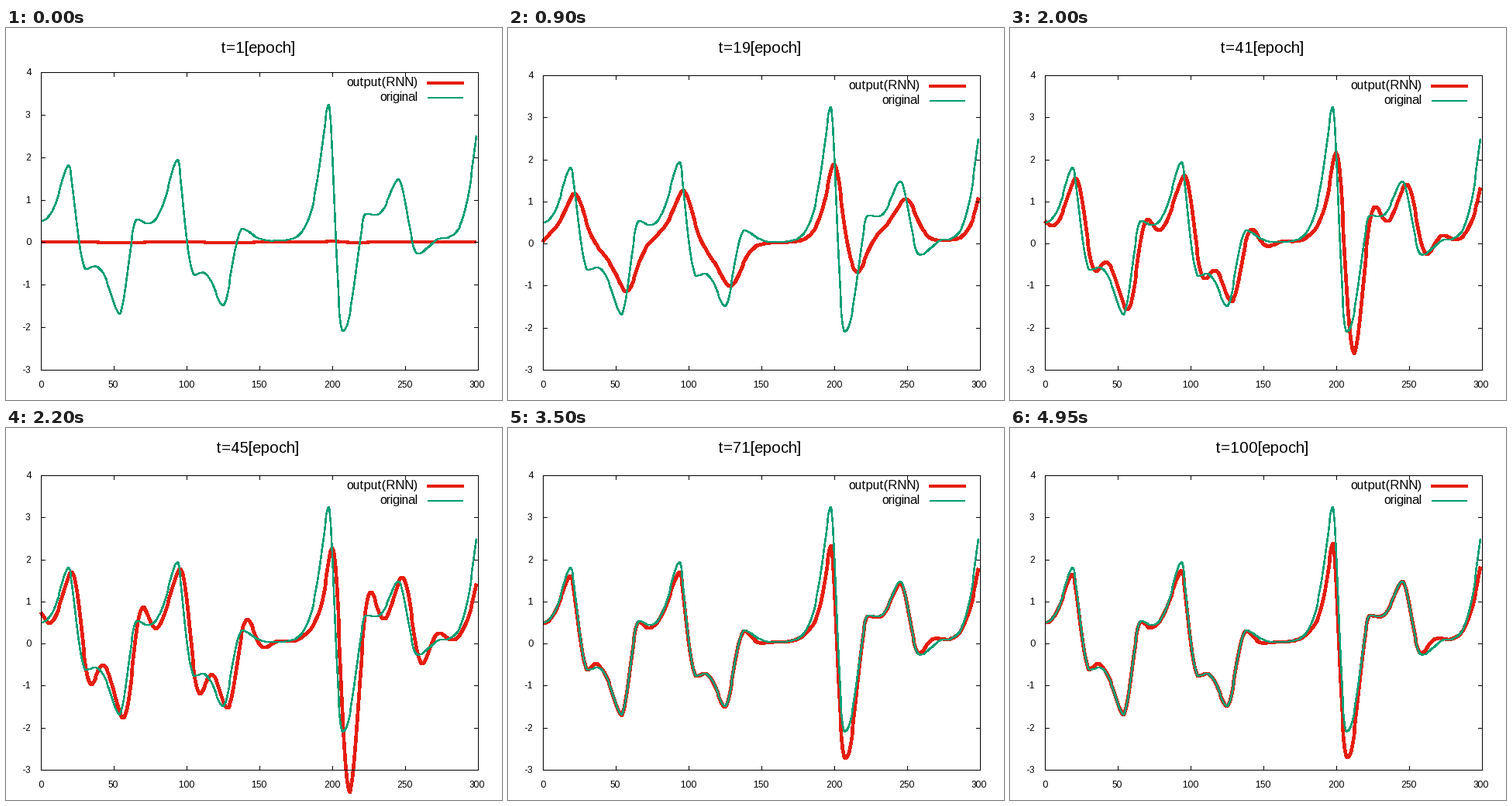
Write a matplotlib script that moves like this. It is 640 px wide and 480 px high and loops after 5000 ms.

```python
import numpy as np
import matplotlib.pyplot as plt
from matplotlib.animation import FuncAnimation

plt.rcParams.update({
    "font.family": "Liberation Sans",
    "text.hinting": "force_autohint",
    "text.hinting_factor": 1,
    "path.simplify": False,
})

W, H, DPI = 640, 480, 80
PT = 72 / DPI                      # one pixel in points
EPOCHS, STEP_MS = 100, 50
LEFT, RIGHT, BOTTOM = 45, 609, 441
RED, GREEN = "#e51e10", "#009e73"
STEPS = np.arange(300)

# Turning points of the signal: step, value, skew of the rise or fall before it.
TURNS = [
    (0, .5, 0), (19, 1.81, 1.27), (31, -.63, -.57), (37, -.565, 0),
    (54, -1.69, .9), (66, .535, -.1), (73.5, .44, 0), (93.8, 1.94, 1.2),
    (105.5, -.77, -.75), (111, -.71, 0), (125, -1.49, .7), (138.3, .32, -.27),
    (158, .035, -1.15), (197.8, 3.25, 3.7), (207.2, -2.1, -.65),
    (223, .67, .55), (230, .64, 0), (245.5, 1.49, .65), (258.5, -.27, -.2),
    (275, .09, 0), (302, 3.0, 2.5),
]
# Where the trained network misses the signal: centre, width, amount.
MISSES = [
    (19, 6, -.15), (36, 4, .09), (72, 4, -.07), (93, 6, -.2), (147, 6, -.1),
    (195.5, 9, -.9), (210, 5.5, -.55), (266, 6, .18), (302, 8, -.75),
]


def ease(t):
    t = np.clip(t, 0, 1)
    return t * t * (3 - 2 * t)


def skewed(t, k):
    """Ease whose time runs exponentially; k > 0 starts slowly."""
    return ease(np.expm1(k * t) / np.expm1(k) if k else t)


def make_signal():
    s = np.zeros(len(STEPS))
    for (x0, y0, _), (x1, y1, k) in zip(TURNS, TURNS[1:]):
        part = (STEPS >= x0) & (STEPS <= x1)
        s[part] = y0 + (y1 - y0) * skewed((STEPS[part] - x0) / (x1 - x0), k)
    return s


def leaky(u, rate):
    """First-order lag."""
    y, out = 0, []
    for value in u:
        y += rate * (value - y)
        out.append(y)
    return np.array(out)


def ringing(u, omega=.3, zeta=.4, y=.79, v=-.03):
    """Second-order lag with overshoot."""
    out = []
    for value in u:
        v += omega ** 2 * (value - y) - 2 * zeta * omega * v
        y += v
        out.append(y)
    return np.array(out)


signal = make_signal()
trained = signal + sum(a * np.exp(-((STEPS - c) / w) ** 2) for c, w, a in MISSES)
midway = ringing(trained)


def output(epoch):
    """Network output: flat, then a lagging copy, then a close fit."""
    if epoch <= 45:
        gain = 1 / (1 + np.exp(-1.7 * (epoch - 3.6)))
        rate = .083 + .011 * (1 - np.exp(-max(epoch - 6, 0) / 5))
        start, end, mix = gain * leaky(signal, rate), midway, ease((epoch - 34) / 11)
    else:
        rest = np.exp(-max(epoch - 57, 0) / 20)
        end = trained * np.where(trained > 0, 1 - .06 * rest, 1 + .015 * rest)
        start, mix = midway, 1 - np.exp((45 - epoch) / 3)
    return (1 - mix) * start + mix * end


def px_x(v):
    return np.round(LEFT + np.asarray(v) * (RIGHT - LEFT) / 300)


def px_y(v, top):
    return np.round(BOTTOM - (np.asarray(v) + 3) * (BOTTOM - top) / 7)


def frame_path(top, tick=5):
    """Border with inward ticks on all four sides."""
    segs = [[(LEFT, top), (RIGHT, top), (RIGHT, BOTTOM), (LEFT, BOTTOM), (LEFT, top)]]
    for x in px_x(range(0, 301, 50)):
        segs += [[(x, BOTTOM), (x, BOTTOM - tick)], [(x, top), (x, top + tick)]]
    for y in px_y(range(-3, 5), top):
        segs += [[(LEFT, y), (LEFT + tick, y)], [(RIGHT, y), (RIGHT - tick, y)]]
    gap = [(np.nan, np.nan)]
    return np.array([p for s in segs for p in s + gap]).T + .5


fig = plt.figure(figsize=(W / DPI, H / DPI), dpi=DPI, facecolor="white")
ax = fig.add_axes([0, 0, 1, 1])
ax.set(xlim=(0, W), ylim=(H, 0))
ax.axis("off")


def line(color, width, z):
    return ax.plot([], [], color=color, lw=width * PT, antialiased=False, snap=False,
                   zorder=z, solid_capstyle="butt", solid_joinstyle="round")[0]


def label(x, y, s, size, ha="left"):
    return ax.text(x, y, s, fontsize=size * PT, ha=ha, va="baseline", color="black")


border = line("black", 1, 4)
red, green = line(RED, 3.6, 2), line(GREEN, 1.5, 3)
red_key, green_key = line(RED, 4, 2), line(GREEN, 2, 3)
title = label(325, 32, "", 20, "center")
red_name = label(531, 0, "output(RNN)", 16, "right")
green_name = label(531, 0, "original", 16, "right")
y_labels = [(v, label(25 if v >= 0 else 21, 0, str(v), 12)) for v in range(-3, 5)]
for v in range(0, 301, 50):
    label(np.floor(px_x(v) - 3.5 * len(str(v))), 464, str(v), 12)


def update(i):
    epoch = i + 1
    top = 57 if epoch == 1 else 61
    title.set_text(f"t={epoch}[epoch]")
    border.set_data(*frame_path(top))
    red.set_data(px_x(STEPS), px_y(output(epoch), top))
    green.set_data(px_x(STEPS), px_y(signal, top))
    red_key.set_data([543, 591], [top + 14] * 2)
    green_key.set_data([544, 590], [top + 33] * 2)
    red_name.set_y(top + 18)
    green_name.set_y(top + 37)
    for v, text in y_labels:
        text.set_y(px_y(v, top) + 4)
    return []


anim = FuncAnimation(fig, update, frames=EPOCHS, interval=STEP_MS,
                     repeat=True, repeat_delay=0, blit=False)
plt.show()
```
